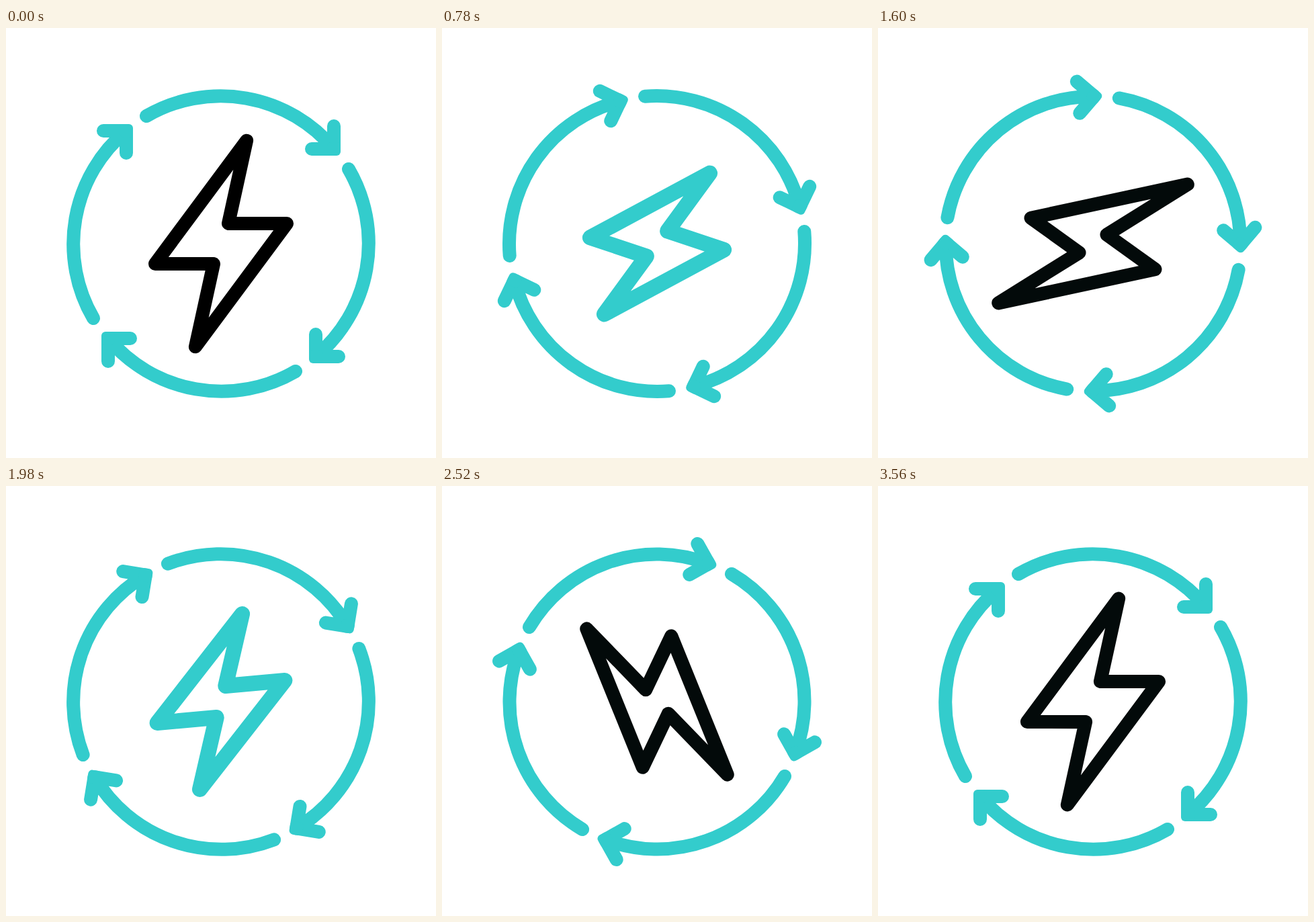
An HTML page that plays this animation: 640x640 px, repeating every 3.6 s.

```html
<!DOCTYPE html>
<html lang="en">
<head>
<meta charset="utf-8">
<title>Energy cycle</title>
<style>
  html, body { margin: 0; width: 100%; height: 100%; overflow: hidden; background: #fff; }
  svg { display: block; width: 100vw; height: 100vh; }
  path { fill: none; stroke-width: 20; stroke-linecap: round; stroke-linejoin: round; }
</style>
</head>
<body>
<svg viewBox="0 0 640 640">
  <defs>
    <g id="arrow">
      <path d="M-111-190A219.7 219.7 0 0 1 168-141M168-175V-141H135"/>
      <rect x="158" y="-151" width="20" height="20" rx="6" stroke="none"/>
    </g>
  </defs>
  <g transform="translate(320 321)">
    <g id="ring" fill="#33cccc" stroke="#33cccc">
      <use href="#arrow"/>
      <use href="#arrow" transform="rotate(90)"/>
      <use href="#arrow" transform="rotate(180)"/>
      <use href="#arrow" transform="rotate(270)"/>
    </g>
    <path id="bolt"/>
  </g>
</svg>
<script>
const LOOP = 3600, START = 120, STOP = 3490, FLASH = 1140;
const ring = document.getElementById('ring');
const bolt = document.getElementById('bolt');

// the bolt's lead over the ring in degrees, and how far its tips reach out
const POSES = [
  { at: START, lead: 0, reach: 0.6 },
  { at: 780, lead: -3.4, reach: 0 },
  { at: 1600, lead: -1, reach: 0.78 },
  { at: 1980, lead: 79.4, reach: 0.07 },
  { at: 2520, lead: 148.7, reach: 0.44 },
  { at: 3000, lead: 141, reach: 1 },
  { at: 3560, lead: 180, reach: 0.6 }
];

const clamp = x => Math.min(1, Math.max(0, x));
const mix = (a, b, k) => a + (b - a) * k;
const ramp = (from, to, x) => {
  const k = clamp((x - from) / (to - from));
  return k * k * (3 - 2 * k);
};
const cubic = (a, b, s) => 3 * (1 - s) * (1 - s) * s * a + 3 * (1 - s) * s * s * b + s * s * s;

// pulls back first, then spins and settles
function spin(x) {
  let lo = 0, hi = 1;
  for (let i = 0; i < 30; i++) {
    const mid = (lo + hi) / 2;
    if (cubic(0.261, 0.26, mid) < x) lo = mid; else hi = mid;
  }
  return cubic(-0.35, 1, (lo + hi) / 2);
}

function pose(t) {
  const next = POSES.findIndex(p => p.at > t);
  const i = next < 0 ? POSES.length - 1 : Math.max(1, next);
  const a = POSES[i - 1], b = POSES[i];
  const k = ramp(a.at, b.at, t);
  return { lead: mix(a.lead, b.lead, k), reach: mix(a.reach, b.reach, k) };
}

function polar(r, deg) {
  const a = deg * Math.PI / 180;
  return [r * Math.cos(a), r * Math.sin(a)];
}

// tip, notch and shoulder, repeated point-symmetrically; "rest" opens the notch
function boltPath(reach, rest) {
  const half = [
    polar(mix(131, 176, reach), -75.4 + 4.9 * reach - 3.6 * rest),
    polar(24.5 + 7.5 * rest, -72.5 + 2.6 * rest),
    polar(100 + 2.5 * rest, -17)
  ];
  const all = half.concat(half.map(([x, y]) => [-x, -y]));
  return 'M' + all.map(p => p.map(v => v.toFixed(2)).join(' ')).join('L') + 'Z';
}

function glow(t) {
  if (t < 140) return 0;
  const u = (t - 140) / FLASH % 1;
  return Math.max(0.05, ramp(0.28, 0.44, u) - ramp(0.7, 0.9, u));
}

function draw(t) {
  const turn = 360 * spin(clamp((t - START) / (STOP - START)));
  const { lead, reach } = pose(t);
  const rest = 1 - ramp(START, 780, t) + ramp(3000, 3560, t);
  const k = glow(t);
  ring.setAttribute('transform', `rotate(${turn})`);
  bolt.setAttribute('transform', `rotate(${turn + lead})`);
  bolt.setAttribute('d', boltPath(reach, rest));
  bolt.style.stroke = `rgb(${[51, 204, 204].map(c => Math.round(c * k))})`;
  bolt.style.strokeWidth = 20 + 3 * k;
}

let origin;
function tick(now) {
  origin ??= now;
  draw(Math.max(0, now - origin) % LOOP);
  requestAnimationFrame(tick);
}
draw(0);
requestAnimationFrame(tick);
</script>
</body>
</html>
```
